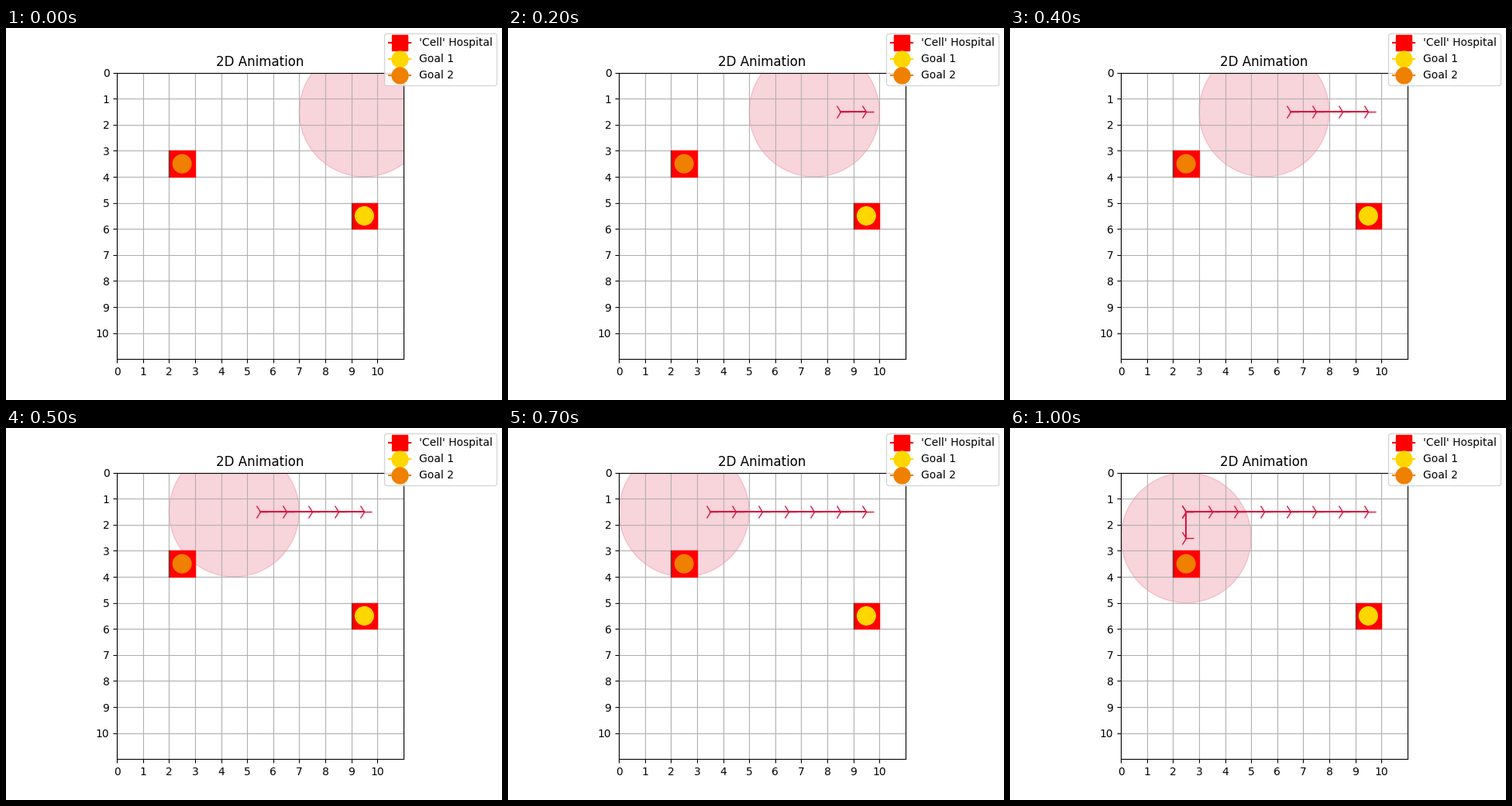
Write a matplotlib script that moves like this. It is 640 by 480 pixels and loops after 1.1 s.

```python
import matplotlib.pyplot as plt
from matplotlib.animation import FuncAnimation
from matplotlib.patches import Circle, Rectangle

SIZE = 11
STEPS = 11
GOLD, ORANGE = "#ffd700", "#f08000"

# Cell centres visited: straight left, a pause at the corner, then down.
PATH = [(9.5 - i, 1.5) for i in range(8)] + [(2.5, 1.5)] + [(2.5, 2.5)] * 2

fig, ax = plt.subplots(figsize=(6.4, 4.8), dpi=100)
ax.set_aspect("equal")
ax.set_xlim(0, SIZE)
ax.set_ylim(SIZE, 0)
ax.set_xticks(range(SIZE))
ax.set_yticks(range(SIZE))
ax.grid(True)
ax.set_title("2D Animation")


def add_goal(col, row, color):
    ax.add_patch(Rectangle((col, row), 1, 1, color="red", lw=1, zorder=1.6))
    ax.plot([col, col], [row, row + 1], color="#484848", lw=0.8, zorder=1.7)
    ax.add_patch(Circle((col + 0.5, row + 0.5), 0.35, color=color, zorder=1.8))


def add_key(marker, color, label):
    ax.plot([], [], marker=marker, color=color, markersize=15, label=label)


add_goal(9, 5, GOLD)
add_goal(2, 3, ORANGE)
add_key("s", "red", "'Cell' Hospital")
add_key("o", GOLD, "Goal 1")
add_key("o", ORANGE, "Goal 2")
fig.legend(loc="upper right")

view = ax.add_patch(Circle(PATH[0], 2.5, color="crimson", alpha=0.18))
trail, = ax.plot([], [], color="crimson", marker="4", markersize=15)


def update(step):
    view.center = PATH[step]
    done = PATH[:step]
    trail.set_data([x for x, _ in done], [y for _, y in done])
    return view, trail


anim = FuncAnimation(fig, update, frames=STEPS, interval=100,
                     repeat=True, repeat_delay=0, blit=False)
plt.show()
```
